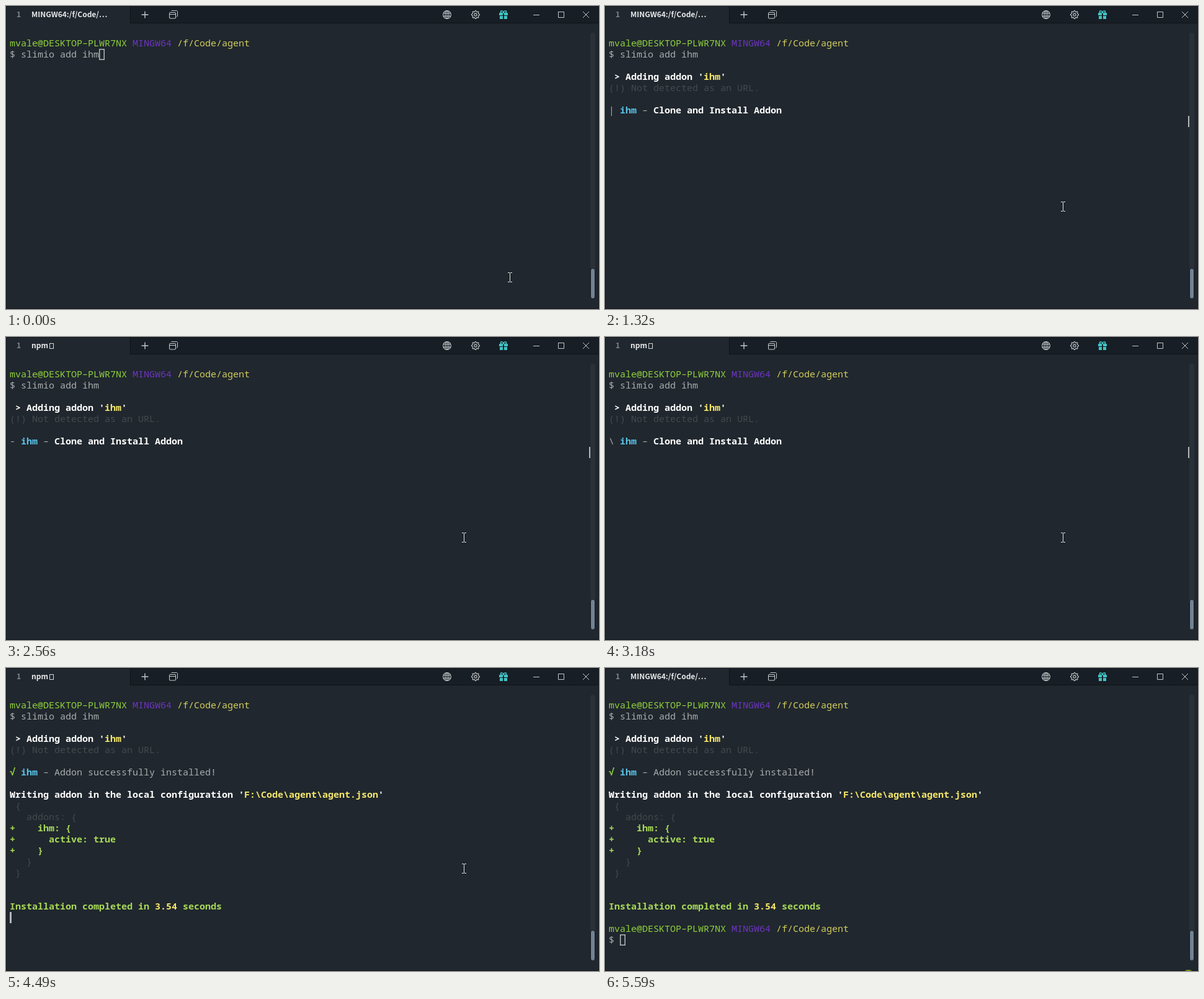
Recreate the animation shown at these times as an HTML page with a canvas. Size 956 px wide and 488 px high, loop 5.67 s.

```html
<!DOCTYPE html>
<html lang="en">
<head>
<meta charset="utf-8">
<title>Terminal</title>
<style>
html, body { margin: 0; width: 100%; height: 100%; overflow: hidden; background: #20272e; }
canvas { display: block; width: 956px; height: 488px; }
</style>
</head>
<body>
<canvas id="stage" width="956" height="488"></canvas>
<script>
const ctx = document.getElementById('stage').getContext('2d');
const LOOP = 5670, COL = 9, ROW = 18, LEFT = 6, TOP = 33;
const MONO = '"Noto Sans Mono", "DejaVu Sans Mono", monospace';
const SANS = '"Noto Sans CJK JP", "Noto Sans CJK SC", "Noto Sans CJK", "Noto Sans", sans-serif';
const C = {
  body: '#20272e', bar: '#171e25', edge: '#0f1317', icon: '#c3c7ca',
  grey: '#a9acae', dim: '#44494d', white: '#ffffff', green: '#8fd03c',
  lime: '#a8d957', purple: '#6d35c2', path: '#d2cd5c', yellow: '#f5e76a',
  cyan: '#58c1e6', teal: '#40c4c4', cursor: '#b4b8bb'
};

// The screen only refreshes at these times: [first, last, count].
const ticks = [
  [0, 0, 1], [70, 380, 5], [700, 780, 2], [930, 930, 1], [1080, 1080, 1],
  [1250, 1480, 4], [1630, 2180, 8], [2330, 2640, 5], [2790, 3180, 6],
  [3330, 3560, 4], [3730, 4110, 6], [4260, 4340, 2], [4490, 4570, 2],
  [4890, 4960, 2], [5590, 5590, 1]
].flatMap(([a, b, n]) => Array.from({ length: n },
  (_, i) => n < 2 ? a : Math.round((a + (b - a) * i / (n - 1)) / 10) * 10));

// Text cursor over time: [from, column, row, shape]
const cursors = [
  [0, 16, 2, 'box'], [70, 16, 2, 'bar'], [300, 0, 3, 'bar'], [700, 0, 3, ''],
  [780, 0, 3, 'bar'], [930, 32, 7, 'bar'], [1080, 0, 8, 'end'], [1400, 0, 8, ''],
  [1630, 0, 8, 'end'], [1790, 1, 0, 'bar'], [2330, 0, 8, 'end'], [2790, 0, 8, ''],
  [3100, 0, 8, 'end'], [3480, 0, 8, ''], [3800, 0, 8, 'end'], [4490, 0, 20, 'bar'],
  [4570, 2, 22, 'bar'], [5590, 2, 22, 'box']
];

const latest = (list, t) => list.filter(e => (e[0] ?? e) <= t).pop();

function rect(x, y, w, h, color) {
  ctx.fillStyle = color;
  ctx.fillRect(x, y, w, h);
}

function line(color, width, ...paths) {
  ctx.strokeStyle = color;
  ctx.lineWidth = width;
  ctx.beginPath();
  for (const p of paths)
    for (let i = 0; i < p.length; i += 2) ctx[i ? 'lineTo' : 'moveTo'](p[i], p[i + 1]);
  ctx.stroke();
}

function label(str, x, y, color, font) {
  ctx.font = font;
  ctx.fillStyle = color;
  ctx.fillText(str, x, y);
}

// Each run is [text, color, weight].
function print(row, ...runs) {
  let col = 0;
  for (const [str, color, weight = 400] of runs) {
    label(str, LEFT + col * COL, TOP + row * ROW + 14, color, `${weight} 15px ${MONO}`);
    col += str.length;
  }
}

function prompt(row, command) {
  print(row, ['mvale@DESKTOP–PLWR7NX ', C.green, 500], ['MINGW64 ', C.purple], ['/f/Code/agent', C.path, 500]);
  print(row + 1, ['$ ' + command, C.grey]);
}

function globe(x, y) {
  ctx.strokeStyle = C.icon;
  ctx.lineWidth = 1.1;
  for (const rx of [6.4, 3]) {
    ctx.beginPath();
    ctx.ellipse(x, y, rx, 6.4, 0, 0, Math.PI * 2);
    ctx.stroke();
  }
  line(C.icon, 1, [x - 6, y - 2.3, x + 6, y - 2.3], [x - 6, y + 2.3, x + 6, y + 2.3], [x, y - 6, x, y + 6]);
}

function gear(x, y) {
  const pts = [];
  for (let i = 0; i < 32; i++) {
    const a = (i - 0.5) * Math.PI / 16, r = i % 4 < 2 ? 6.5 : 5;
    pts.push(x + r * Math.cos(a), y + r * Math.sin(a));
  }
  pts.push(pts[0], pts[1]);
  line(C.icon, 1.1, pts);
  ctx.beginPath();
  ctx.arc(x, y, 2.1, 0, Math.PI * 2);
  ctx.stroke();
}

function gift(x, y) {
  rect(x - 7, y - 3, 14, 4, C.teal);
  rect(x - 6, y + 2, 12, 5, C.teal);
  rect(x - 1, y - 3, 2, 10, C.bar);
  ctx.strokeStyle = C.teal;
  ctx.lineWidth = 1.5;
  for (const s of [-1, 1]) {
    ctx.beginPath();
    ctx.ellipse(x + s * 2.4, y - 4.4, 2.3, 1.6, s * -0.4, 0, Math.PI * 2);
    ctx.stroke();
  }
}

function chrome(npm) {
  rect(0, 0, 956, 488, C.body);
  rect(201, 0, 755, 27, C.bar);
  rect(200, 0, 1, 28, C.edge);
  rect(200, 27, 756, 1, C.edge);
  const font = `700 12px ${SANS}`;
  label('1', 17, 18, '#7f878e', font);
  if (npm) {
    label('npm', 41, 18, '#e6e8ea', font);
    ctx.strokeStyle = '#d5d8da';
    ctx.lineWidth = 1;
    ctx.strokeRect(70.5, 10.5, 6, 8);
  } else {
    label('MINGW64:/f/Code/', 41, 18, '#e6e8ea', font);
    for (let i = 0; i < 3; i++) label('.', 150 + i * 4.7, 18, '#e6e8ea', font);
  }

  line(C.icon, 1.4, [218.5, 14, 229.5, 14], [224, 8.5, 224, 19.5]);
  ctx.lineWidth = 1.1;
  ctx.beginPath();
  ctx.roundRect(263.5, 10.5, 10, 9.5, 1.5);
  ctx.stroke();
  line(C.icon, 1, [263.5, 13.5, 273.5, 13.5], [266, 8.5, 267, 7.5, 275.5, 7.5, 276.5, 8.5, 276.5, 16.5, 275, 17.5]);
  globe(711, 14);
  gear(757, 14);
  gift(802, 14);
  line(C.icon, 1, [850, 14.5, 860, 14.5], [890.5, 9.5, 899.5, 9.5, 899.5, 18.5, 890.5, 18.5, 890.5, 9],
    [930, 9, 940, 19], [940, 9, 930, 19]);

  ctx.fillStyle = '#293038';
  ctx.beginPath();
  ctx.roundRect(942, 43, 8, 429, 4);
  ctx.fill();
  ctx.fillStyle = '#728292';
  ctx.strokeStyle = '#12171c';
  ctx.lineWidth = 1;
  ctx.beginPath();
  ctx.roundRect(942.5, 422.5, 7, 49, 3.5);
  ctx.fill();
  ctx.stroke();
  ctx.strokeRect(0.5, 0.5, 955, 487);
}

function output(t) {
  prompt(1, 'slimio add ihm');
  if (t < 930) return;
  print(4, [" > Adding addon '", C.white, 700], ['ihm', C.yellow, 700], ["'", C.white, 700]);
  print(5, ['(!) Not detected as an URL.', C.dim]);
  if (t < 4490) {
    const spin = '-\\|/'[Math.floor((t - 930) / 130) % 4];
    print(7, [spin + ' ', C.grey], ['ihm', C.cyan, 700], [' – ', C.grey], ['Clone and Install Addon', C.white, 700]);
    return;
  }
  print(7, ['√ ', C.green, 700], ['ihm', C.cyan, 700], [' – Addon successfully installed!', C.grey]);
  print(9, ["Writing addon in the local configuration '", C.white, 700],
    ['F:\\Code\\agent\\agent.json', C.yellow, 700], ["'", C.white, 700]);
  [' {', '   addons: {', '+    ihm: {', '+      active: true', '+    }', '   }', ' }'].forEach((s, i) =>
    print(10 + i, s[0] === '+' ? [s, C.lime, 700] : [s, C.dim]));
  print(19, ['Installation completed in ', C.lime, 700], ['3.54', C.yellow, 700], [' seconds', C.lime, 700]);
  if (t >= 4570) prompt(21, '');
}

function cursor(t) {
  const [, col, row, shape] = latest(cursors, t);
  const x = LEFT + col * COL, y = TOP + row * ROW;
  if (shape === 'bar') rect(x, y, 3, ROW, C.cursor);
  if (shape === 'end') rect(940, y, 2, ROW, C.cursor);
  if (shape === 'box') {
    ctx.strokeStyle = C.cursor;
    ctx.lineWidth = 1.5;
    ctx.strokeRect(x + 0.75, y + 0.75, COL - 1.5, ROW - 1.5);
  }
}

function pointer(t) {
  if (t >= 4960) return;
  const p = Math.min(t / 380, 1), k = 1 - (1 - p) ** 2;
  const x = Math.round(812 - 74 * k) + (t >= 4890 ? 3 : 0);
  const y = Math.round(437 - 114 * k);
  rect(x, y - 7, 1, 14, '#e4e6e8');
  for (const dy of [-8, 7]) {
    rect(x - 3, y + dy, 3, 1, '#e4e6e8');
    rect(x + 1, y + dy, 3, 1, '#e4e6e8');
  }
}

function draw(now) {
  const t = latest(ticks, now % LOOP);
  chrome(t >= 1790 && t < 4570);
  output(t);
  cursor(t);
  pointer(t);
  if (t >= 5590) {
    ctx.fillStyle = '#87961f';
    ctx.beginPath();
    ctx.arc(940.5, 496, 10, 0, Math.PI * 2);
    ctx.fill();
  }
}

const start = performance.now();
function loop() {
  draw(performance.now() - start);
  requestAnimationFrame(loop);
}
loop();
</script>
</body>
</html>
```
